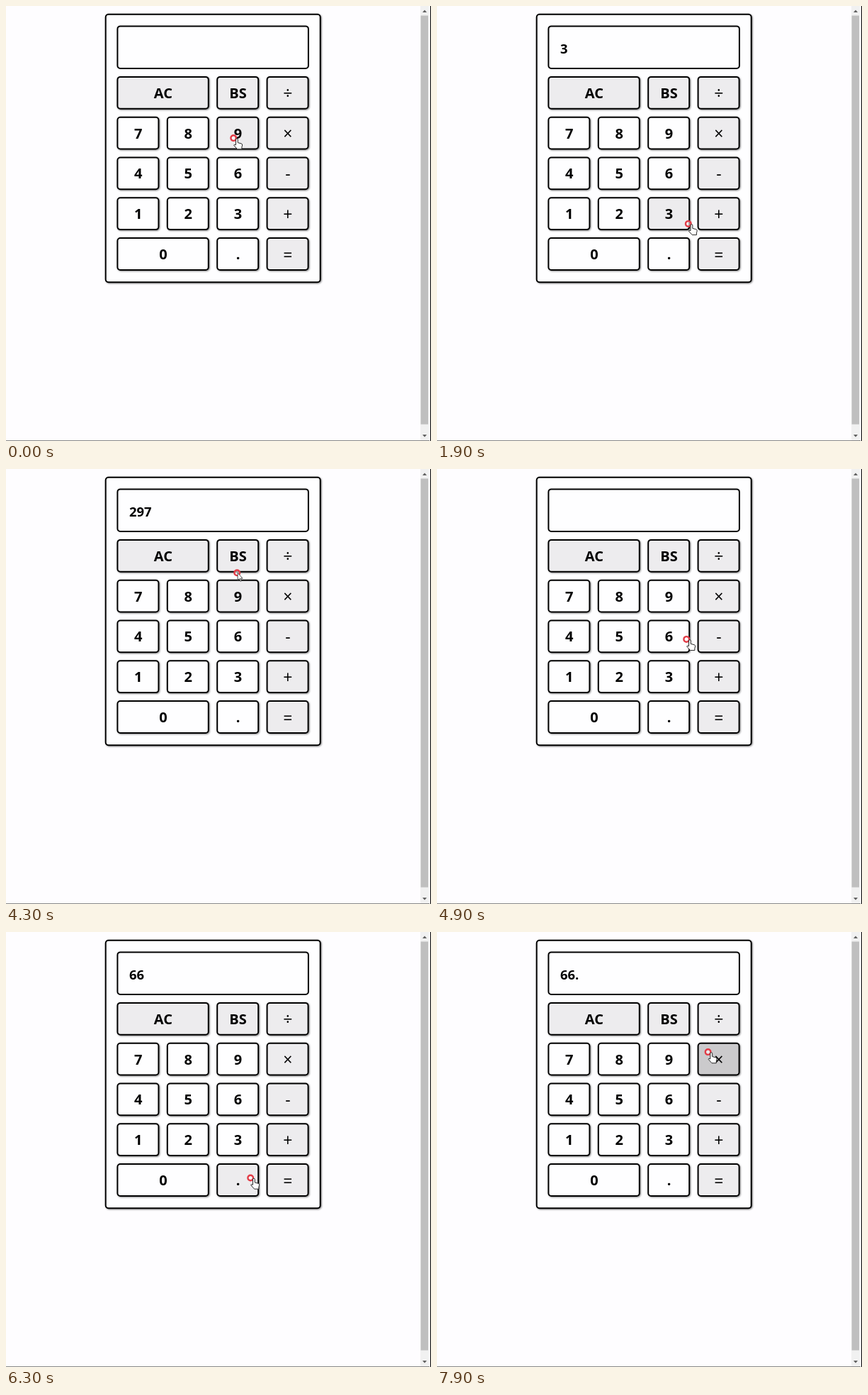
Recreate the animation shown at these times as an HTML page. Size 600 by 613 pixels, loop 8000 ms.

```html
<!DOCTYPE html>
<html>
<head>
<meta charset="utf-8">
<title>Calculator</title>
<style>
  html, body { margin: 0; width: 100%; height: 100%; overflow: hidden; background: #fefdff; }
  svg { display: block; font: 700 20px "Open Sans", "Noto Sans", sans-serif; }
  .box { fill: #fefeff; stroke: #000; stroke-width: 2; }
  .raised { filter: drop-shadow(1.2px 1.2px 1px #0007); }
  .label { text-anchor: middle; }
  .sign { font-size: 23px; font-weight: 500; }
  .op, .hover { fill: #edecee; }
  .op.hover { fill: #cbcacc; }
  .box.down { fill: url(#sunk); filter: none; }
  #value { font-size: 18.4px; }
</style>
</head>
<body>
<svg id="stage" width="600" height="613">
  <linearGradient id="sunk" x2="0" y2="1">
    <stop stop-color="#a9a8aa"/>
    <stop offset=".15" stop-color="#cbcacc"/>
  </linearGradient>
  <rect class="box raised" x="140.700" y="11.700" width="303" height="377.500" rx="4"/>
  <rect class="box" x="157.400" y="28.400" width="269.500" height="59.500" rx="4"/>
  <text id="value" x="174" y="67"/>
  <g id="keys"></g>
  <path fill="#f1f1f1" d="M585 0h11.5v613H585z"/>
  <path fill="#bfbfbf" d="M585.5 13.5h10.5v576h-10.5z"/>
  <path fill="#606060" d="M588 9l3-3.5 3 3.5zM588 604l3 3.5 3-3.5z"/>
  <path d="M599 0h1v613h-1z"/>
  <path fill="#888" d="M0 612h598v1H0z"/>
  <g id="pointer">
    <circle id="ring" r="3.8" fill="#fff" fill-opacity=".6" stroke-width="2.4"/>
    <g fill="#fff" stroke="#222" stroke-width=".9" stroke-linejoin="round">
      <path id="hand" transform="scale(1.08)" d="M3 9V2a1.300 1.300 0 0 1 2.600 0V6l4.500 1.200q1.500.4 1.400 2L10.800 12v2.500H5L.5 9.500q-.3-1.600 2.500-.5z"/>
      <path id="arrow" transform="scale(.87)" d="M1 0V12l2.700-2.400 1.800 4.200 1.700-.7-1.800-4.100H9z"/>
    </g>
  </g>
</svg>
<script>
const LOOP = 8000, STEP = 100;
const COL = 70.4, ROW = 56.8, W = 60, H = 46.8;
const $ = id => document.getElementById(id);

function add(tag, attrs, text = '') {
  const el = document.createElementNS('http://www.w3.org/2000/svg', tag);
  for (const name in attrs) el.setAttribute(name, attrs[name]);
  el.textContent = text;
  return $('keys').appendChild(el);
}

// A repeated label makes one wide key.
const keys = {};
['AC AC BS ÷', '7 8 9 ×', '4 5 6 -', '1 2 3 +', '0 0 . ='].forEach((line, row) =>
  line.split(' ').forEach((label, col) => {
    if (keys[label]) keys[label].w += COL;
    else keys[label] = { label, row, sign: col === 3, x: 156.4 + col * COL, y: 98.9 + row * ROW, w: W };
  }));

for (const k of Object.values(keys)) {
  k.cx = k.x + k.w / 2;
  k.cy = k.y + H / 2;
  k.el = add('rect', {
    class: 'box raised' + (k.sign || !k.row ? ' op' : ''),
    x: k.x + 1, y: k.y + 1, width: k.w - 2, height: H - 2, rx: 4
  });
  add('text', {
    class: k.sign ? 'label sign' : 'label',
    x: k.cx + .3, y: k.cy + (k.sign ? 9 : 7.5)
  }, k.label);
}

// key, arrival, departure, offset from the key's centre, press times
const stops = [
  ['9', 0, 900, -6, 7, 500, 800],
  ['×', 1100, 1300, 1.5, 7, 1200],
  ['3', 1600, 1800, 14, 0, 1700],
  ['=', 2100, 2500, -4, -2, 2200],
  ['6', 2800, 3100, 16, 17],
  ['9', 3300, 4200, -3, 1],
  ['BS', 4300, 4300, -1, 24],
  ['AC', 4500, 4600, 45, 5, 4500],
  ['6', 4900, 6000, 25, 4, 5300, 5600],
  ['.', 6200, 6900, 18, -3, 6500],
  ['-', 7300, 7500, -20, 0],
  ['3', 7700, 7700, 8, -19],
  ['×', 7800, LOOP, -15, -10]
].map(([label, arrive, leave, dx, dy, ...presses]) =>
  ({ label, arrive, leave, presses, x: keys[label].cx + dx, y: keys[label].cy + dy }));

const presses = stops.flatMap(s => s.presses.map(at => ({ at, label: s.label })));

function place(t) {
  const i = Math.max(0, stops.findLastIndex(s => s.arrive <= t));
  const a = stops[i], b = stops[i + 1] || a;
  if (t <= a.leave) return [a.x, a.y];
  const k = (t - a.leave) / (b.arrive - a.leave), e = k * k * (3 - 2 * k);
  return [a.x + (b.x - a.x) * e, a.y + (b.y - a.y) * e];
}

function reading(t) {
  let text = '', held = '', fresh = false;
  for (const { at, label } of presses) {
    if (at + STEP > t) break;
    if (label === '×') held = text;
    else if (label === '=') text = String(held * text);
    else if (label === 'AC') text = '';
    else text = fresh ? label : text + label;
    fresh = '×='.includes(label);
  }
  return text;
}

const keyAt = ([x, y], inset = 0) => Object.values(keys).find(k =>
  x >= k.x && x <= k.x + k.w && y >= k.y && y <= k.y + H - inset);

function draw(t) {
  const pos = place(t);
  const over = keyAt(place(t - STEP)); // highlight trails the pointer
  const press = presses.find(p => t >= p.at && t < p.at + 2 * STEP);
  for (const k of Object.values(keys)) {
    k.el.classList.toggle('hover', k === over);
    k.el.classList.toggle('down', k.label === press?.label);
  }
  $('value').textContent = reading(t);
  $('pointer').setAttribute('transform', `translate(${pos})`);
  $('ring').setAttribute('stroke', press ? '#4fc4dc' : '#e23b46');
  $('ring').setAttribute('stroke-dasharray', press ? '5 1.5' : 'none');
  const onKey = !!keyAt(pos, 8);
  $('hand').style.display = onKey ? '' : 'none';
  $('arrow').style.display = onKey ? 'none' : '';
}

const start = performance.now();
function tick() {
  const t = (performance.now() - start) % LOOP;
  draw(Math.floor(t / STEP) * STEP);
  requestAnimationFrame(tick);
}
tick();
</script>
</body>
</html>
```
